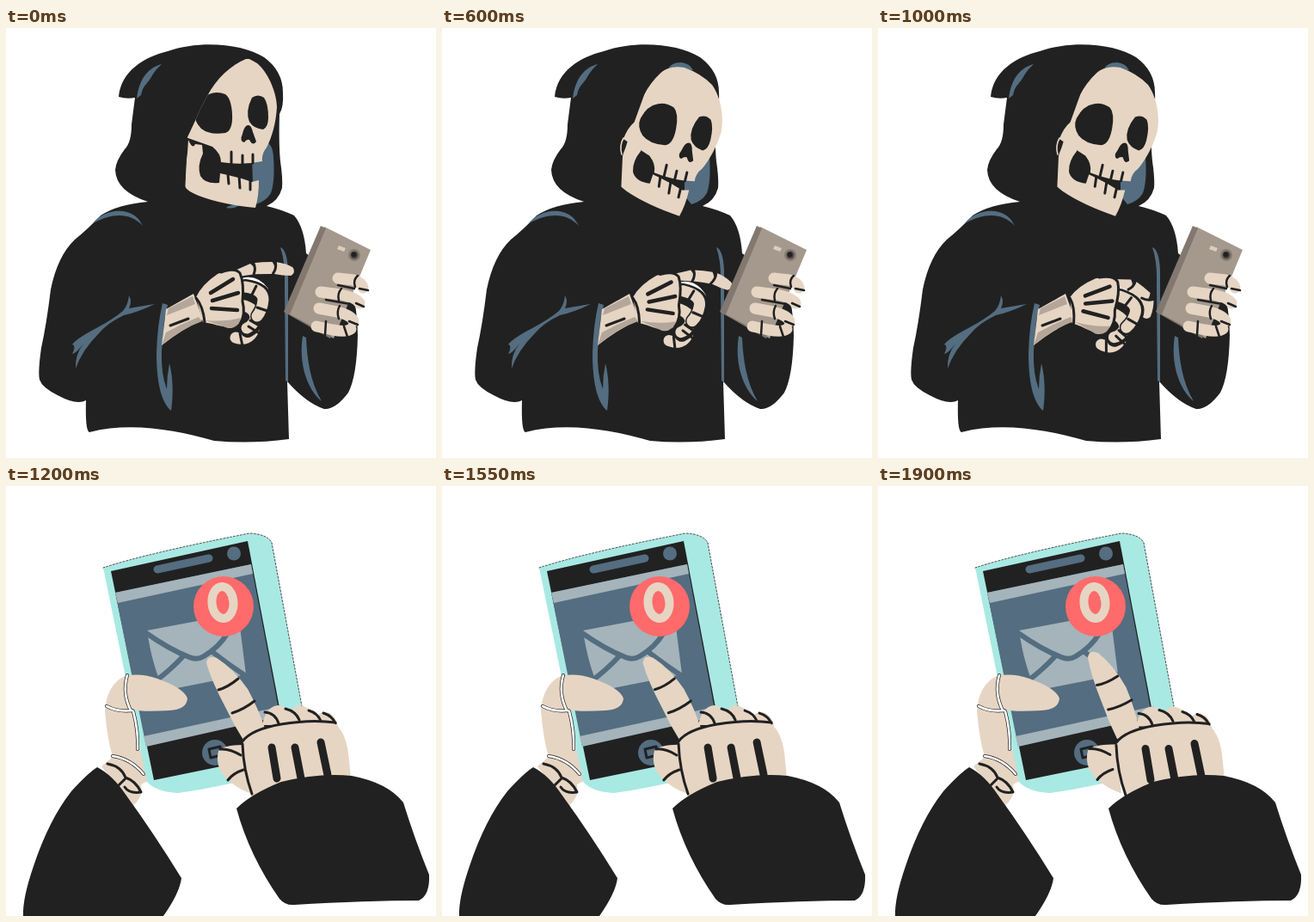
Recreate the animation shown at these times as an HTML page. Size 500 px wide and 500 px high, loop 2000 ms.

```html
<!DOCTYPE html>
<html lang="en">
<head>
<meta charset="utf-8">
<title>Reaper checks messages</title>
<style>
  html, body { margin: 0; width: 100%; height: 100%; overflow: hidden; background: #fff; }
  svg { display: block; width: 100vw; height: 100vh; }
  path, circle, ellipse { stroke-linecap: round; stroke-linejoin: round; }
  .ink { fill: #212121; }
  .bone { fill: #e6d5c3; }
  .blue { fill: #546d80; }
  .pale { fill: #a4b4ba; }
  .teal { fill: #a9e9e3; }
  .line { fill: none; stroke: #212121; stroke-width: 3; }
  .curl { fill: none; stroke: #e6d5c3; stroke-width: 13; }
  .rim { fill: none; stroke: #212121; stroke-width: 18; }
</style>
</head>
<body>
<svg viewBox="0 0 500 500" xmlns="http://www.w3.org/2000/svg">
  <defs>
    <clipPath id="opening">
      <path d="M279 36 C262 43 245 58 234 79 Q225 95 219 110 L211 127 L205 260 H400 V36 Z"/>
    </clipPath>
  </defs>

  <g id="reaper">
    <g class="ink">
      <path d="M131 80 C134 50 160 34 188 27 C225 14 275 18 300 34 Q322 50 322 75 Q323 92 318 100 Q317 135 319 155 Q322 175 321 186 Q317 201 303 207 Q320 211 335 218 Q347 232 349 262 L400 300 Q409 325 409 357 Q408 405 398 424 Q383 444 370 443 Q349 436 327 411 L329 478 Q285 484 242 480 C195 467 145 458 97 470 Q92 469 93 433 Q82 439 60 427 Q42 418 39 409 Q37 400 41 372 Q47 345 52 304 Q60 265 80 246 Q95 234 110 218 Q130 205 165 202 Q128 190 127 165 Q128 154 138 141 Q146 133 146 112 L150 81 Q140 83 131 80 Z"/>
    </g>
    <g class="blue">
      <path d="M181 42 C166 46 155 58 152 82 L157 78 C159 66 166 64 170 55 Q174 48 181 42 Z"/>
      <path d="M101 227 C113 211 147 204 159 230 C144 214 124 215 101 227 Z"/>
      <path d="M77 368 Q82 361 105 349 Q124 339 136 329 Q142 322 143 311 Q147 318 143 326 Q160 323 173 321 Q152 331 137 334 Q118 343 108 355 Q88 375 81 396 Q80 380 90 367 Q82 378 77 379 Q82 369 77 368 Z"/>
      <path d="M182 320 Q176 345 175 378 C175 410 180 435 192 445 C195 425 194 405 190 390 Q187 405 187 420 Q180 402 181 375 L184 340 L188 322 Z"/>
      <path d="M345 358 C340 390 350 420 367 434 C354 412 350 385 349 360 Z"/>
      <path d="M319 255 Q327 258 328 282 L328 412 L325 410 L324 300 Q325 272 319 255 Z"/>
      <path d="M263 48 Q266 40 278 40 Q288 41 292 49 Z"/>
      <path d="M300 132 Q310 133 311 150 Q313 178 308 192 Q302 202 290 205 L282 195 V145 Z"/>
      <path d="M256 209 Q262 204 272 206 Q264 211 256 209 Z"/>
    </g>
    <path id="strap" d="M211 128 Q206 137 209 147" fill="none" stroke="#e6d5c3" stroke-width="1.6"/>

    <g clip-path="url(#opening)">
      <g id="skull">
        <path class="ink" d="M229 134 L250 140 L286 150 L287 180 L248 182 Q230 184 225 168 Q224 152 229 134 Z"/>
        <g id="jaw">
          <path class="bone" d="M212 130 Q217 142 220 135 L228 136 L229 146 Q222 160 226 172 Q232 182 248 180 L249 169 L258 171 Q272 174 286 179 L294 177 Q294 196 290 209 Q250 205 224 195 Q207 188 208 182 Q209 158 211 145 Z"/>
          <path class="line" d="M258 170 L259 181 M271 172 L272 186 M284 177 L284 188"/>
        </g>
        <path class="bone" d="M218 70 Q226 30 256 29 Q276 31 292 41 C307 54 315 78 315 92 C314 110 309 128 303 139 Q297 146 298 155 Q275 160 250 156 Q250 146 240 138 L206 126 Q208 112 214 104 Z"/>
        <path class="line" d="M262 144 L262 157 M275 148 L275 159 M287 147 L287 157"/>
        <path class="ink" d="M236 77 Q245 73 255 77 Q262 82 263 100 Q264 119 255 122 Q237 125 227 117 Q218 108 220 98 Q224 82 236 77 Z"/>
        <path class="ink" d="M286 81 Q293 76 300 81 Q305 88 305 104 Q305 115 299 118 Q288 117 283 109 Q278 97 286 81 Z"/>
        <path class="ink" d="M281 113 Q285 112 287 121 L291 132 Q287 138 283 130 Q280 129 277 133 Q271 132 275 123 Q277 114 281 113 Z"/>
      </g>
    </g>

    <path class="bone" d="M186 327 L218 309 L229 339 Q205 350 181 369 Z"/>
    <path d="M189 326 L217 312 L220 321 L187 334 Z M186 354 Q204 344 224 336 L228 341 Q203 350 181 369 Z" fill="#b4a699"/>
    <path class="line" d="M191 346 L212 338"/>

    <g id="hand">
      <path d="M274 291 Q292 286 305 303 Q306 309 301 309 L278 306 Z" fill="#fff"/>
      <g id="index"></g>
      <path class="rim" d="M268 360 Q284 368 290 353"/>
      <path class="curl" d="M267 360 Q282 365 288 351"/>
      <path class="rim" d="M274 322 Q294 326 292 338 Q288 347 281 351"/>
      <path class="curl" d="M274 322 Q291 326 290 338 Q287 346 280 349"/>
      <path class="rim" d="M278 301 Q300 304 300 316 Q299 328 293 335"/>
      <path class="curl" d="M278 301 Q299 304 299 316 Q298 328 292 335"/>
      <path class="line" d="M292 325 L304 329 M284 340 L296 347 M291 300 L284 314 M272 355 L275 370 M282 347 L293 354"/>
      <path class="bone" d="M221 313 Q228 298 246 286 Q262 279 271 284 Q277 292 275 318 Q278 332 272 343 Q262 351 240 344 L229 342 Z"/>
      <path d="M232 340 Q255 342 273 337 Q270 350 258 349 Z" fill="#b4a699"/>
      <path class="line" d="M221 314 Q229 323 231 342 M250 284 Q266 278 272 285 Q277 296 275 318 Q279 333 272 344"/>
      <path class="line" stroke-width="4" d="M238 308 L264 292 M240 317 L270 308 M239 326 L269 328" style="stroke-width:4.5"/>
    </g>

    <path d="M370 231 L424 258 L381 361 L325 331 Z" fill="#a5998d"/>
    <path d="M366 230 L372 233 L330 333 L378 358 L377 361 L323 330 Z" fill="#82786f"/>
    <path d="M387 253 L395 256 L393 260 L385 257 Z" fill="#dccdbd"/>
    <circle cx="405" cy="264" r="7" fill="#867b73"/>
    <circle cx="405" cy="264" r="4.5" fill="#4e4842"/>
    <circle cx="404.500" cy="263.500" r="3" class="ink"/>
    <g class="curl">
      <path d="M386 291 L404 293 Q414 296 415 302"/>
      <path d="M366 307 L390 310 Q408 314 411 320"/>
      <path d="M364 326 L385 330 Q402 334 404 341"/>
      <path d="M361 347 L380 351 Q396 354 401 350"/>
    </g>
    <path class="line" d="M409 288 Q403 293 406 301 M411 303 L421 305 M390 303 Q385 309 387 317 M407 320 L416 324 M388 323 Q384 330 387 338 M399 341 L409 345 M372 341 L371 357 M393 347 L397 359 M386 299 L405 303 M372 316 L400 321" style="stroke-width:2.5"/>
  </g>

  <g id="closeup">
    <path class="bone" d="M138 221 Q117 231 115 262 Q118 295 124 315 L111 326 L147 372 Q160 362 157 347 L170 340 L160 225 Z"/>
    <path class="teal" d="M113 95 Q165 78 283 55 Q304 56 309 66 L344 256 L330 330 Q240 352 200 357 Q175 356 164 344 Z"/>
    <path class="line" stroke-dasharray="2 2" d="M113 95 Q165 78 283 55 Q304 56 309 66 L344 256" style="stroke-width:.8"/>
    <path class="ink" d="M122 99 L281 64 L328 310 L172 342 Z"/>
    <path class="blue" d="M127 124 L285 91 L318 265 L163 303 Z"/>
    <path class="pale" d="M127 124 L285 91 L287 102 L130 136 Z M160 291 L321 256 L323 267 L163 303 Z"/>
    <path d="M176 97 L236 84" fill="none" stroke="#546d80" stroke-width="9"/>
    <circle class="blue" cx="265" cy="78.500" r="8"/>
    <circle class="blue" cx="243" cy="310" r="15"/>
    <path class="line" d="M236 306 L249 303 L251 313 L238 316 Z"/>
    <path class="pale" d="M164 168 L270 148 L279 219 L184 238 Q170 210 164 168 Z"/>
    <path d="M163 171 Q190 190 213 199 Q222 203 230 198 Q248 187 257 172 M175 226 Q192 213 205 199 M279 221 Q258 207 240 193" fill="none" stroke="#546d80" stroke-width="6"/>
    <circle cx="253" cy="140" r="35" fill="#ff6a6b"/>
    <ellipse cx="252" cy="135.500" rx="12.500" ry="18.500" transform="rotate(-4 252 136)" fill="none" stroke="#e6d5c3" stroke-width="10"/>

    <path class="bone" d="M140 221 Q155 217 176 224 Q207 235 211 247 Q210 260 190 261 Q160 263 145 260 Q135 240 140 221 Z"/>
    <g fill="none">
      <path id="seam" d="M141 220 Q135 241 145 261 M117 256 Q130 263 147 261 M124 314 Q145 317 160 335 M148 262 Q154 285 153 306" stroke="#212121" stroke-width="4"/>
      <path d="M141 220 Q135 241 145 261 M117 256 Q130 263 147 261 M124 314 Q145 317 160 335 M148 262 Q154 285 153 306" stroke="#fff" stroke-width="2.600"/>
    </g>
    <path class="line" d="M118 323 Q134 326 139 339 Q151 343 157 356 Q143 358 138 350 M130 349 L139 340"/>
    <path class="ink" d="M106 327 Q124 336 140 360 Q172 404 204 456 Q202 473 183 500 H20 Q19 480 32 442 Q50 388 76 355 Q95 334 106 327 Z"/>

    <g id="fist">
      <g class="bone">
        <path d="M298 278 Q302 256 317 255 Q332 257 337 278 Z"/>
        <path d="M327 278 Q328 257 341 255 Q358 257 364 278 Z"/>
        <path d="M358 278 Q360 262 373 263 Q384 266 386 280 Z"/>
      </g>
      <path class="line" d="M301 263 Q313 264 317 276 M325 259 Q337 262 341 272 M352 261 Q362 264 366 273 M369 264 Q379 267 383 276"/>
      <g id="thumb">
        <path class="bone" d="M280 301 Q255 300 247 308 Q243 325 254 338 Q268 352 286 358 Z"/>
        <path class="line" d="M249 306 Q260 305 273 313 M258 342 Q264 334 276 330"/>
      </g>
      <g id="pointer">
        <path class="bone" d="M233 206 Q234 196 245 200 Q264 212 281 236 Q293 258 302 284 L277 297 Q265 278 255 257 Q239 227 233 206 Z"/>
        <path class="line" d="M247 237 Q258 234 270 224 M263 264 Q276 260 289 250"/>
      </g>
      <path class="bone" d="M275 296 Q290 281 320 277 Q350 272 380 275 Q394 283 398 310 L402 350 L286 364 Q277 325 275 296 Z"/>
      <path class="line" d="M275 297 Q285 283 320 277 Q355 271 383 275 M275 300 Q276 330 286 358"/>
      <path class="line" d="M309 304 L315 340 M336 304 L343 340 M366 298 L374 336" style="stroke-width:9"/>
    </g>
    <path class="ink" d="M268 375 Q285 358 320 344 Q365 333 402 337 Q444 345 462 368 Q475 410 492 452 Q493 476 480 482 Q420 482 335 487 Q325 488 318 480 Q283 430 268 375 Z"/>
  </g>
</svg>

<script>
const LOOP = 2000, STEP = 50, CUT = 1200;
const byId = id => document.getElementById(id);
const progress = (t, from, to) => Math.min(1, Math.max(0, (t - from) / (to - from)));
const mix = (a, b, k) => a + (b - a) * k;
const smooth = k => k * k * (3 - 2 * k);
const place = (id, transform) => byId(id).setAttribute('transform', transform);

// Chain of three finger bones, each drawn along its own x axis.
function drawIndex(bend) {
  const late = bend ** 2.3;
  const bones = [
    { angle: mix(-17, -3, bend), length: 25, back: 4, front: 6.5 },
    { angle: mix(-2, 29, late), length: 24, back: 6.5, front: 7 },
    { angle: mix(12, 84, late), length: 23, back: 7, front: 5 }
  ];
  let x = 264, y = 287, markup = '';
  for (const { angle, length, back, front } of bones) {
    const turn = angle * Math.PI / 180;
    markup += `<g transform="translate(${x} ${y}) rotate(${angle})">
      <path class="bone" d="M0 ${-back} Q${length / 2} ${-back - 1} ${length - 2} ${-front} Q${length + 3} 0 ${length - 2} ${front} Q${length / 2} ${back} 0 ${back} Z"/>
      <path class="line" d="M0 ${-back} Q3 0 0 ${back}"/></g>`;
    x += length * Math.cos(turn);
    y += length * Math.sin(turn);
  }
  byId('index').innerHTML = markup;
}

function drawReaper(t) {
  const nod = smooth(progress(t, 300, 600));
  const bend = progress(t, 300, 1000);
  place('skull', `translate(${10 * nod} ${12 * nod}) rotate(${13.2 * nod} 242 99)`);
  place('jaw', `translate(0 ${-10.7 * nod})`);
  byId('strap').setAttribute('opacity', nod);
  place('hand', `rotate(${11 * bend} 222 325)`);
  drawIndex(bend);
}

function drawCloseup(t) {
  const swipe = progress(t, 1350, 1900) ** 3;
  place('fist', `translate(${2 * swipe} ${1.5 * swipe})`);
  place('pointer', `translate(0 ${-3 * swipe}) rotate(${6 * swipe} 288 288)`);
  place('thumb', `translate(${-5 * swipe} ${-2 * swipe})`);
}

function render(time) {
  const t = Math.floor(time % LOOP / STEP) * STEP;
  const near = t >= CUT;
  byId('reaper').style.display = near ? 'none' : '';
  byId('closeup').style.display = near ? '' : 'none';
  if (near) drawCloseup(t); else drawReaper(t);
}

const start = performance.now();
function tick() {
  render(performance.now() - start);
  requestAnimationFrame(tick);
}
tick();
</script>
</body>
</html>
```
